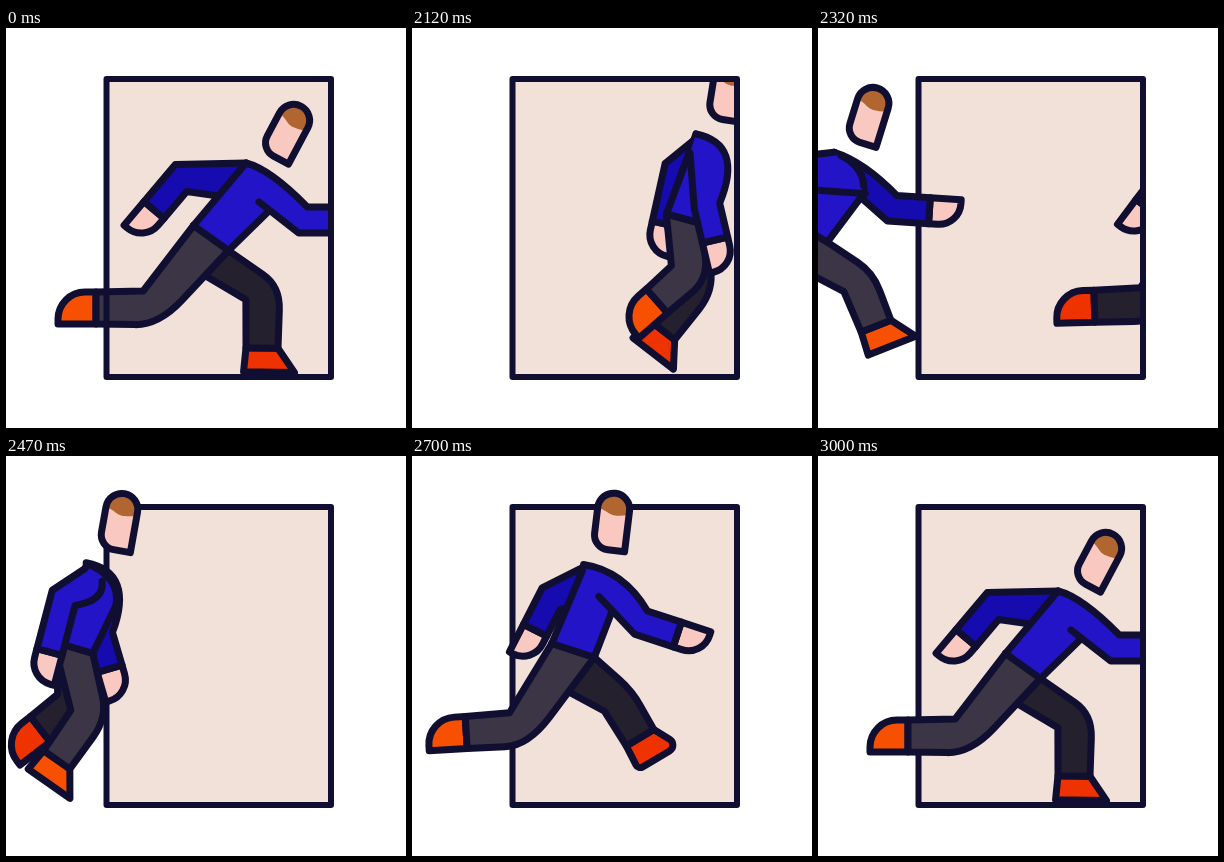
Recreate the animation shown at these times as an HTML page with a canvas. Size 400 px wide and 400 px high, loop 3.02 s.

```html
<!DOCTYPE html>
<html lang="en">
<head>
<meta charset="utf-8">
<title>Runner through a doorway</title>
<style>
html, body { margin: 0; width: 100%; height: 100%; overflow: hidden; background: #fff; }
canvas { display: block; width: 400px; height: 400px; }
</style>
</head>
<body>
<canvas id="stage" width="400" height="400"></canvas>
<script>
const c = document.getElementById('stage').getContext('2d');
const LOOP = 3020, START = 2018, STEP = 25, STRIDE = 200, LAP = 400;
const INK = '#100f31', SKIN = '#f8c8c1', HAIR = '#b16631', DOOR = '#f2e1d9';
const NEAR = { sleeve: '#2314c8', leg: '#3b3545', shoe: '#f75000' };
const FAR = { sleeve: '#160bae', leg: '#25202d', shoe: '#ee3200' };

// step number -> distance run
const TRAVEL = [[-1, 0], [0, 13], [4, 68], [12, 185], [23, 320], [31, 382], [39, 400], [47, 400]];
// distance, hip height, half hip line, shoulder, head, head tilt
const BODY = [
  [0, 210, 17.5, 12.5, 35, -75, 77, -107, 28],
  [68, 191, 18.5, 5, 11, -85, 43, -128, 9],
  [120, 189, 22, 2.5, 0, -90, 24, -139, 2.5],
  [183, 202, 19.5, 11, 25, -79, 59.5, -117, 16]
];
// distance, knee, ankle, how flat the foot is
const LEG = [
  [0, 52, 55, 51, 110, 1],
  [68, 11, 67, -23, 111, 1],
  [120, -40, 81, -89, 90, 0],
  [183, -59, 74, -113, 76, 0],
  [200, -60, 70, -115, 70, 0],
  [268, 4, 54, -28, 82, 0],
  [320, 35, 53, 42, 87, 0.5],
  [383, 50, 51, 69, 94, 1]
];
// distance, elbow, wrist, then from the shoulder: back root, front root, curve
const ARM = [
  [0, 92, -18, 129, -18, 13, 39, 0, 0, 24, 6],
  [68, 22, -13, 30, 21, -6, 19, 0, 0, 48, 10],
  [120, 5, -42, 2, -14, 0, 4, 20, 22, 20, 40],
  [183, -36, -57, -61, -23, 0, 0, 31, 41, -13, 39],
  [200, -30, -60, -57, -28, 0, 0, 31, 41, -14, 35],
  [268, -8, -49, -20, 5, -2, 6, 14, 16, 20, 36],
  [320, 44, -34, 73, -7, 5, 21, 0, 0, 45, 3],
  [383, 83, -23, 120, -20, 18, 37, 0, 0, 30, 9]
];

const clamp = (v, lo, hi) => Math.min(hi, Math.max(lo, v));
const add = (p, q, k = 1) => [p[0] + q[0] * k, p[1] + q[1] * k];
const mix = (p, q, k) => [p[0] + (q[0] - p[0]) * k, p[1] + (q[1] - p[1]) * k];
const unit = (p, q) => {
  const x = q[0] - p[0], y = q[1] - p[1], l = Math.hypot(x, y) || 1;
  return [x / l, y / l];
};
const normal = d => [d[1], -d[0]];

// Cubic curve through the rows, repeating every `period`
function sample(rows, u, period) {
  const n = rows.length;
  u -= Math.floor((u - rows[0][0]) / period) * period;
  const key = i => rows[(i + n) % n];
  const at = i => key(i)[0] + Math.floor(i / n) * period;
  let i = n - 1;
  while (rows[i][0] > u) i--;
  const h = at(i + 1) - at(i), s = (u - at(i)) / h;
  return key(i).slice(1).map((v, j) => {
    const slope = k => (key(k + 1)[j + 1] - key(k)[j + 1]) / (at(k + 1) - at(k));
    const mid = slope(i), w = key(i + 1)[j + 1];
    const a = h * (slope(i - 1) + mid) / 2, b = h * (mid + slope(i + 1)) / 2;
    return v + s * (a + s * (3 * (w - v) - 2 * a - b + s * (2 * (v - w) + a + b)));
  });
}

const move = p => c.moveTo(...p);
const line = (...ps) => ps.forEach(p => c.lineTo(...p));
const curve = (p, q) => c.quadraticCurveTo(...p, ...q);
const round = (p, q, r) => c.arcTo(...p, ...q, Math.max(0, r));
function paint(fill) {
  c.fillStyle = fill;
  c.fill();
  c.stroke();
}

// Offset at a joint that keeps both limb parts equally wide
function miter(root, joint, end, half) {
  const a = normal(unit(root, joint)), b = normal(unit(joint, end));
  const k = half / Math.max(0.4, 1 + a[0] * b[0] + a[1] * b[1]);
  return [(a[0] + b[0]) * k, (a[1] + b[1]) * k];
}

function drawLeg(hip, half, u, look) {
  const [kx, ky, ax, ay, raw] = sample(LEG, u, LAP);
  const flat = clamp(raw, 0, 1);
  const knee = add(hip, [kx, ky]), ankle = add(hip, [ax, ay]);
  const d = unit(knee, ankle), n = normal(d);
  const local = (along, out) => add(add(ankle, d, along), n, out);
  const back = local(0, -16), front = local(0, 16);

  const size = 38 - 14 * flat;
  const heel = local(size, -16 - 2 * flat), toe = local(size, 16 + 17 * flat);
  c.beginPath();
  move(back);
  round(heel, toe, 27 * (1 - flat));
  round(toe, front, 48 * flat * (1 - flat));
  line(front);
  c.closePath();
  paint(look.shoe);

  const m = miter(hip, knee, ankle, 17);
  const inner = add(knee, m, -1), outer = add(knee, m);
  const hipBack = add(hip, half, -1), hipFront = add(hip, half);
  const lift = clamp(kx / 50, 0, 1);
  c.beginPath();
  move(hipBack);
  line(hipFront, mix(outer, hipFront, 0.33));
  curve(outer, mix(outer, front, 0.38));
  line(front, back, inner, add(hipBack, [3 * lift, 45 * lift]));
  c.closePath();
  paint(look.leg);
}

function drawArm(hip, shoulder, u, look) {
  const [ex, ey, wx, wy, ...r] = sample(ARM, u, LAP);
  const elbow = add(hip, [ex, ey]), wrist = add(hip, [wx, wy]);
  const [rootA, rootB, bend] = [0, 2, 4].map(i => add(shoulder, r.slice(i, i + 2)));
  const d = unit(elbow, wrist), n = normal(d);
  const local = (along, out) => add(add(wrist, d, along), n, out);
  const a = local(0, -13), b = local(0, 13), tipA = local(31, -13), tipB = local(31, 13);

  const side = -clamp(3 * Math.cos((u - 140) / LAP * 2 * Math.PI), -1, 1);
  c.beginPath();
  move(a);
  round(tipA, tipB, 11 * (1 + side));
  round(tipB, b, 11 * (1 - side));
  line(b);
  c.closePath();
  paint(SKIN);

  const m = miter(mix(rootA, rootB, 0.5), elbow, wrist, 13);
  c.beginPath();
  move(rootA);
  line(add(elbow, m, -1), a, b, add(elbow, m));
  curve(bend, rootB);
  paint(look.sleeve);
}

function drawTorso(hip, half, shoulder) {
  c.beginPath();
  move(shoulder);
  line(add(hip, half, -1), add(hip, half), add(shoulder, [29, 42]));
  curve(add(shoulder, [34, 14]), shoulder);
  c.closePath();
  paint(NEAR.sleeve);
}

function drawHead(p, tilt) {
  c.save();
  c.translate(...p);
  c.rotate(tilt * Math.PI / 180);
  const shape = new Path2D();
  shape.roundRect(-16, -28, 32, 57, [16, 16, 0, 15]);
  c.fillStyle = SKIN;
  c.fill(shape);
  c.save();
  c.clip(shape);
  c.beginPath();
  c.moveTo(-20, -30);
  c.lineTo(-20, -11);
  c.bezierCurveTo(-8, -13, -6, -5, 4, -6);
  c.quadraticCurveTo(10, -6, 20, -10);
  c.lineTo(20, -30);
  c.fillStyle = HAIR;
  c.fill();
  c.restore();
  c.stroke(shape);
  c.restore();
}

function drawRunner(x, run, top, right) {
  const [y, hx, hy, sx, sy, px, py, tilt] = sample(BODY, run, STRIDE);
  const hip = [x, y], half = [hx, hy], shoulder = add(hip, [sx, sy]);
  c.save();
  c.beginPath();
  c.rect(0, top, right, 400 - top);
  c.clip();
  c.lineWidth = 7;
  drawArm(hip, shoulder, run + STRIDE, FAR);
  drawLeg(hip, half, run, FAR);
  drawLeg(hip, half, run + STRIDE, NEAR);
  drawTorso(hip, half, shoulder);
  drawArm(hip, shoulder, run, NEAR);
  drawHead(add(hip, [px, py]), tilt);
  c.restore();
}

function draw(t) {
  const step = clamp(Math.floor((t - START) / STEP), -1, 39);
  const run = sample(TRAVEL, step, 1000)[0];
  c.clearRect(0, 0, 400, 400);
  c.strokeStyle = INK;
  c.lineJoin = c.lineCap = 'round';
  c.fillStyle = DOOR;
  c.fillRect(100, 51, 225, 298);
  drawRunner(205 + run, run, 51, 325); // leaving, behind the frame
  c.lineWidth = 6;
  c.strokeRect(100.5, 51, 224.5, 298);
  drawRunner(205 + run - LAP, run, 0, 322); // coming in, over the frame
}

function tick(now) {
  draw(now % LOOP);
  requestAnimationFrame(tick);
}
draw(0);
requestAnimationFrame(tick);
</script>
</body>
</html>
```
